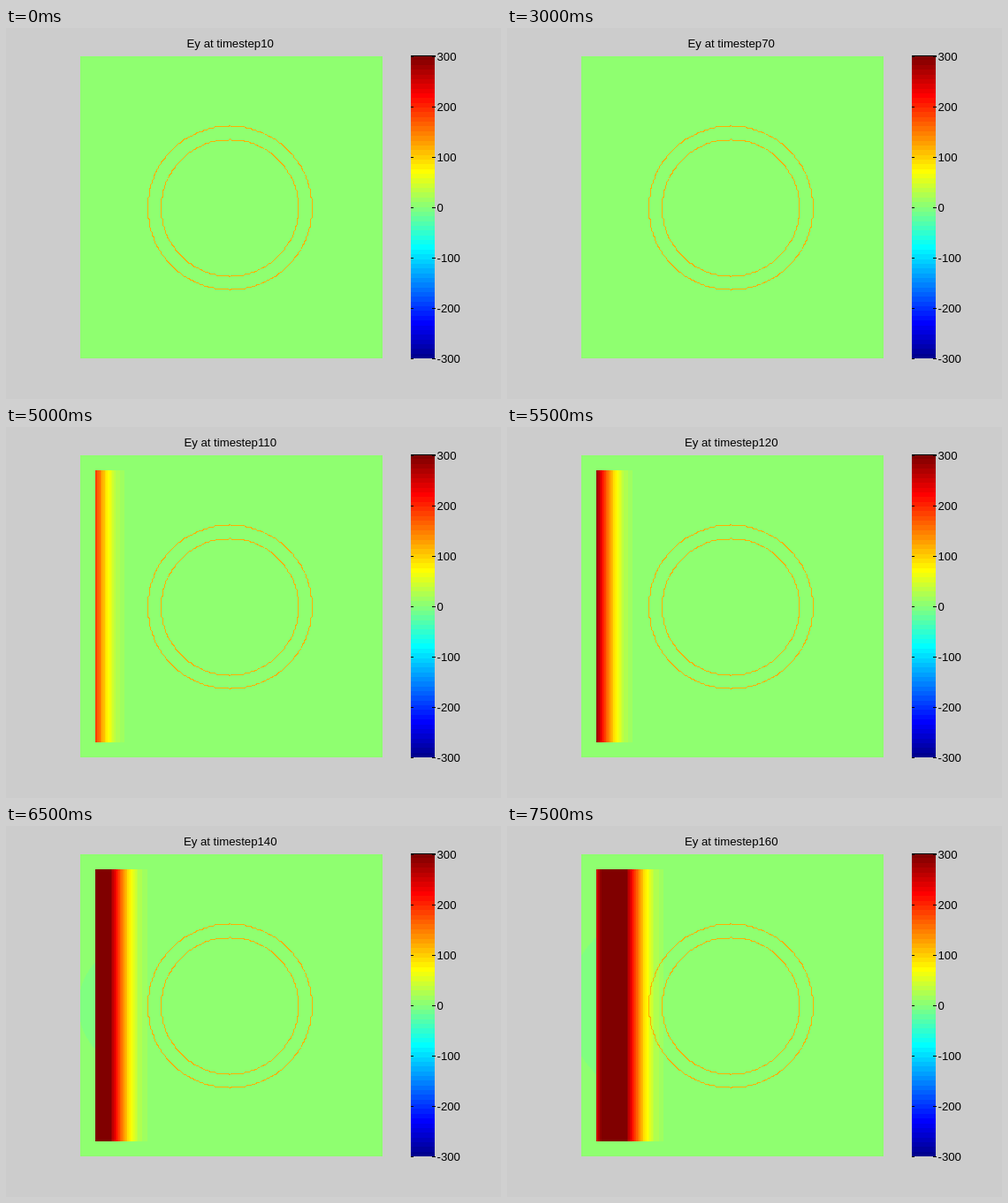
Animation of 560x420 px, one loop 8000 ms. Source, as an HTML page:

```html
<!DOCTYPE html>
<html lang="en">
<head>
<meta charset="utf-8">
<title>Ey field</title>
<style>
  html, body { margin: 0; width: 100%; height: 100%; overflow: hidden; background: #ccc; }
  svg { display: block; }
  text { font: 13.2px "Liberation Sans", Arial, sans-serif; fill: #000; }
</style>
</head>
<body>
<svg id="stage" width="560" height="420" viewBox="0 0 560 420">
  <defs><clipPath id="strip"><rect x="84" y="49" width="17" height="308"/></clipPath></defs>
</svg>
<script>
const LOOP = 8000, STEP_MS = 500;
const PLOT = { x: 84, y: 32, size: 342 };
const CELL = PLOT.size / 200;
const FIRST_CELL = 10, COLUMNS = 50;
const PULSE = { peak: 377, center: 138.3, width: 33.7 };

const stage = document.getElementById('stage');

function add(tag, attrs, parent = stage) {
  const node = document.createElementNS('http://www.w3.org/2000/svg', tag);
  for (const key in attrs) node.setAttribute(key, attrs[key]);
  parent.appendChild(node);
  return node;
}

function rect(x, y, width, height, fill) {
  return add('rect', { x, y, width, height, fill, 'shape-rendering': 'crispEdges' });
}

// 64-level jet colour map
function jet(level) {
  const channel = low =>
    Math.round(255 * Math.max(0, Math.min(1, (level - low) / 16, (low + 48 - level) / 16)));
  return `rgb(${channel(23)},${channel(7)},${channel(-9)})`;
}

function fieldColor(value) {
  return jet(Math.max(0, Math.min(63, Math.floor(32 + value * 64 / 600))));
}

function pulse(step) {
  return PULSE.peak * Math.exp(-(((step - PULSE.center) / PULSE.width) ** 2));
}

// Marching-squares outline of a rasterised disc; rows lie half a cell off its centre
function addRing(radius) {
  const cx = 253.3, cy = 203.7, limit = Math.ceil(radius) + 1;
  const inside = (i, j) => i * i + j * j <= radius * radius;
  let d = '';
  for (let i = -limit; i < limit; i++) {
    for (let j = -limit - 0.5; j < limit; j++) {
      const topLeft = inside(i, j), topRight = inside(i + 1, j);
      const bottomRight = inside(i + 1, j + 1), bottomLeft = inside(i, j + 1);
      const points = [];
      if (topLeft !== topRight) points.push([i + 0.5, j]);
      if (topRight !== bottomRight) points.push([i + 1, j + 0.5]);
      if (bottomRight !== bottomLeft) points.push([i + 0.5, j + 1]);
      if (bottomLeft !== topLeft) points.push([i, j + 0.5]);
      if (points.length < 2) continue;
      const [p, q] = points.map(([x, y]) =>
        `${(cx + x * 1.705).toFixed(2)} ${(cy + y * 1.7).toFixed(2)}`);
      d += `M${p}L${q}`;
    }
  }
  add('path', { d, fill: 'none', stroke: '#ffaf00', 'shape-rendering': 'crispEdges' });
}

function addColorBar() {
  const x = 458, width = 27;
  const edge = k => Math.round(31.07 + 343 * (1 - k / 64));
  for (let k = 0; k < 64; k++) rect(x, edge(k + 1), width, edge(k) - edge(k + 1), jet(k));
  rect(x, 31, width + 1, 1, '#000');
  for (let value = -300; value <= 300; value += 100) {
    const y = 203 - value * 0.57;
    rect(x, y, 3, 1, '#000');
    rect(x + 24, y, 4, 1, '#000');
    add('text', { x: 487.5, y: y + 5 }).textContent = value;
  }
}

rect(PLOT.x, PLOT.y, PLOT.size, PLOT.size, jet(32));
const echo = add('circle', { cy: 203.5, fill: jet(31), 'clip-path': 'url(#strip)',
  'shape-rendering': 'crispEdges' });
const cellEdge = k => Math.round(PLOT.x + 0.3 + (FIRST_CELL + k) * CELL);
const columns = Array.from({ length: COLUMNS }, (_, k) =>
  rect(cellEdge(k), 49, cellEdge(k + 1) - cellEdge(k), 308, jet(32)));
addRing(54.5);
addRing(45.5);
addColorBar();
const title = add('text', { x: 253.7, y: 22, 'text-anchor': 'middle' });

let shown = 0;

function render(time) {
  const step = 10 * (1 + Math.floor((time % LOOP) / STEP_MS));
  if (step === shown) return;
  shown = step;
  title.textContent = 'Ey at timestep' + step;
  // The wave advances half a cell per time step
  columns.forEach((column, k) => column.setAttribute('fill', fieldColor(pulse(step - 2 * k))));
  const age = step - 150;
  echo.setAttribute('cx', 166 + age);
  echo.setAttribute('r', age < -10 ? 0 : 91 + 1.7 * age);
}

const start = performance.now();
function tick() {
  render(performance.now() - start);
  requestAnimationFrame(tick);
}
render(0);
requestAnimationFrame(tick);
</script>
</body>
</html>
```
